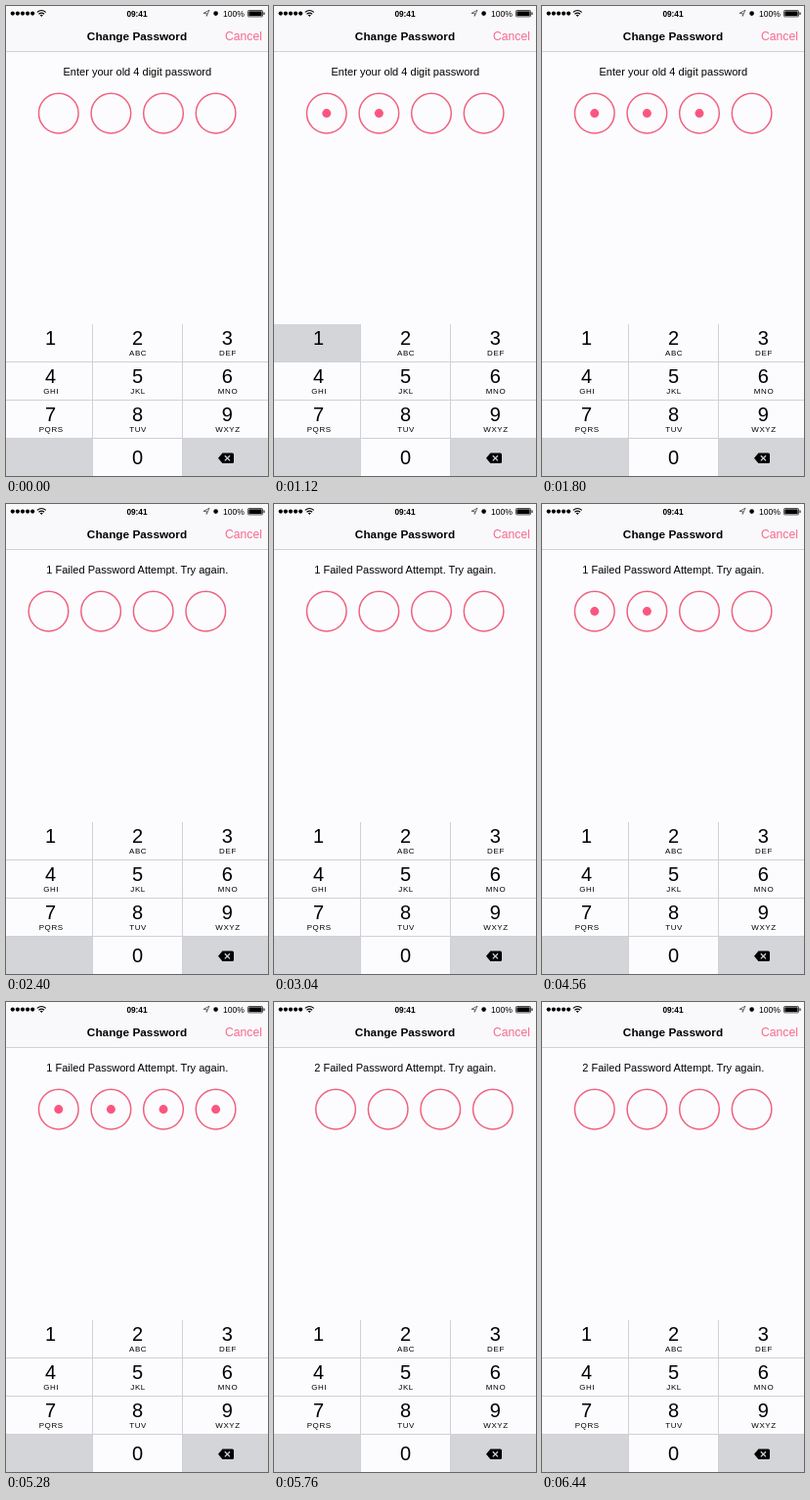
An HTML page for the animation above (6.48 s loop, 268 by 480 pixels).

```html
<!DOCTYPE html>
<html lang="en">
<head>
<meta charset="utf-8">
<title>Change Password</title>
<style>
  html, body { margin: 0; width: 100%; height: 100%; overflow: hidden; background: #fcfcfe; }
  svg { display: block; width: 268px; height: 480px; font-family: "Liberation Sans", Arial, sans-serif; }
  .mid { text-anchor: middle; }
  .bold { font-weight: bold; }
  .line { fill: none; stroke: #d0d1d6; }
  .digit { font-size: 20px; }
  .letters { font-size: 8px; letter-spacing: .6px; }
</style>
</head>
<body>
<svg viewBox="0 0 268 480">
  <rect width="268" height="480" fill="#fcfcfe"/>
  <rect width="268" height="46" fill="#f9f9fb"/>

  <g id="signal"></g>
  <g fill="none" stroke="#000" stroke-width="1.2">
    <path d="M31.8 6.4Q36.3 2.6 40.8 6.4M33.5 8.2Q36.3 6 39.1 8.2"/>
    <path d="M34.7 9.2L36.3 11L37.9 9.2Q36.3 8.3 34.7 9.2Z" fill="#000" stroke="none"/>
    <path d="M202 7.4L208 4.2L205.2 10.4V7.4Z" stroke="#333" stroke-width=".7"/>
  </g>
  <text class="mid bold" x="134" y="10.7" font-size="8.3">09:41</text>
  <circle cx="214.6" cy="7.6" r="2.3"/>
  <text x="222" y="10.7" font-size="8.6">100%</text>
  <rect x="247.5" y="4.5" width="15" height="6.4" rx="1" fill="none" stroke="#000" stroke-width=".7"/>
  <rect x="248.4" y="5.4" width="13.2" height="4.6"/>
  <rect x="263.5" y="6.4" width="1" height="2.6"/>

  <text class="mid bold" x="134" y="35" font-size="11.8">Change Password</text>
  <text x="224" y="35" font-size="12.2" fill="#f96a8c">Cancel</text>
  <path class="line" d="M0 46.5H268"/>

  <text id="prompt" class="mid" x="134.3" y="71.2" font-size="11.05"></text>
  <g id="pins"></g>

  <g fill="#d3d5d9">
    <rect id="pressed" y="325" width="88" height="38.5"/>
    <rect y="442" width="88" height="38"/>
    <rect x="181" y="442" width="87" height="38"/>
  </g>
  <path class="line" d="M88.5 325V480M180.5 325V480M0 363.5H268M0 402.5H268M0 441.5H268"/>
  <g id="keys"></g>
  <path d="M217 461.8L221.4 456.5H231.5Q233 456.5 233 458V465.6Q233 467.1 231.5 467.1H221.4Z"/>
  <path d="M223.8 459.2L229 464.4M229 459.2L223.8 464.4" stroke="#d3d5d9" stroke-width="1.3"/>
</svg>

<script>
const LOOP = 6480, STEP = 40;
const HOLD = 160, SHAKE = 560, SWING = 140;
const attempts = [
  { presses: [640, 1080, 1440, 1840], fail: 2120 },
  { presses: [3600, 4080, 4600, 5040], fail: 5560 }
];
const $ = id => document.getElementById(id);

function add(parent, tag, attrs, text = "") {
  const node = document.createElementNS("http://www.w3.org/2000/svg", tag);
  for (const name in attrs) node.setAttribute(name, attrs[name]);
  node.textContent = text;
  return parent.appendChild(node);
}

for (let i = 0; i < 5; i++) add($("signal"), "circle", { cx: 6.8 + i * 5.1, cy: 7.6, r: 2.1 });

const dots = [0, 1, 2, 3].map(i => {
  const cx = 53.8 + i * 53.6, cy = 109.6;
  add($("pins"), "circle", { cx, cy, r: 20.3, fill: "none", stroke: "#f0627f", "stroke-width": 1.5 });
  return add($("pins"), "circle", { cx, cy, r: 4.5, fill: "#fa5680" });
});

const columns = [45.6, 134.5, 226.4];
["", "ABC", "DEF", "GHI", "JKL", "MNO", "PQRS", "TUV", "WXYZ"].forEach((letters, i) => {
  const x = columns[i % 3], y = 346.3 + Math.floor(i / 3) * 39;
  add($("keys"), "text", { class: "mid digit", x, y }, i + 1);
  add($("keys"), "text", { class: "mid letters", x: x + 0.6, y: y + 11 }, letters);
});
add($("keys"), "text", { class: "mid digit", x: 134.5, y: 468 }, "0");

function draw(t) {
  const failed = attempts.filter(a => t >= a.fail).length;
  const current = attempts[failed];
  const typed = current ? current.presses.filter(p => t >= p) : [];
  const last = typed[typed.length - 1];
  const sinceFail = failed ? t - attempts[failed - 1].fail : SHAKE;
  const shift = sinceFail < SHAKE ? -10.3 * Math.cos(2 * Math.PI * sinceFail / SWING) : 0;

  $("prompt").textContent = failed
    ? failed + " Failed Password Attempt. Try again."
    : "Enter your old 4 digit password";
  $("pins").setAttribute("transform", `translate(${shift} 0)`);
  dots.forEach((dot, i) => dot.style.display = i < typed.length ? "" : "none");
  $("pressed").style.display = t - last < HOLD ? "" : "none";
}

const start = performance.now();
function frame() {
  const t = (performance.now() - start) % LOOP;
  draw(Math.floor(t / STEP) * STEP);
  requestAnimationFrame(frame);
}
frame();
</script>
</body>
</html>
```
